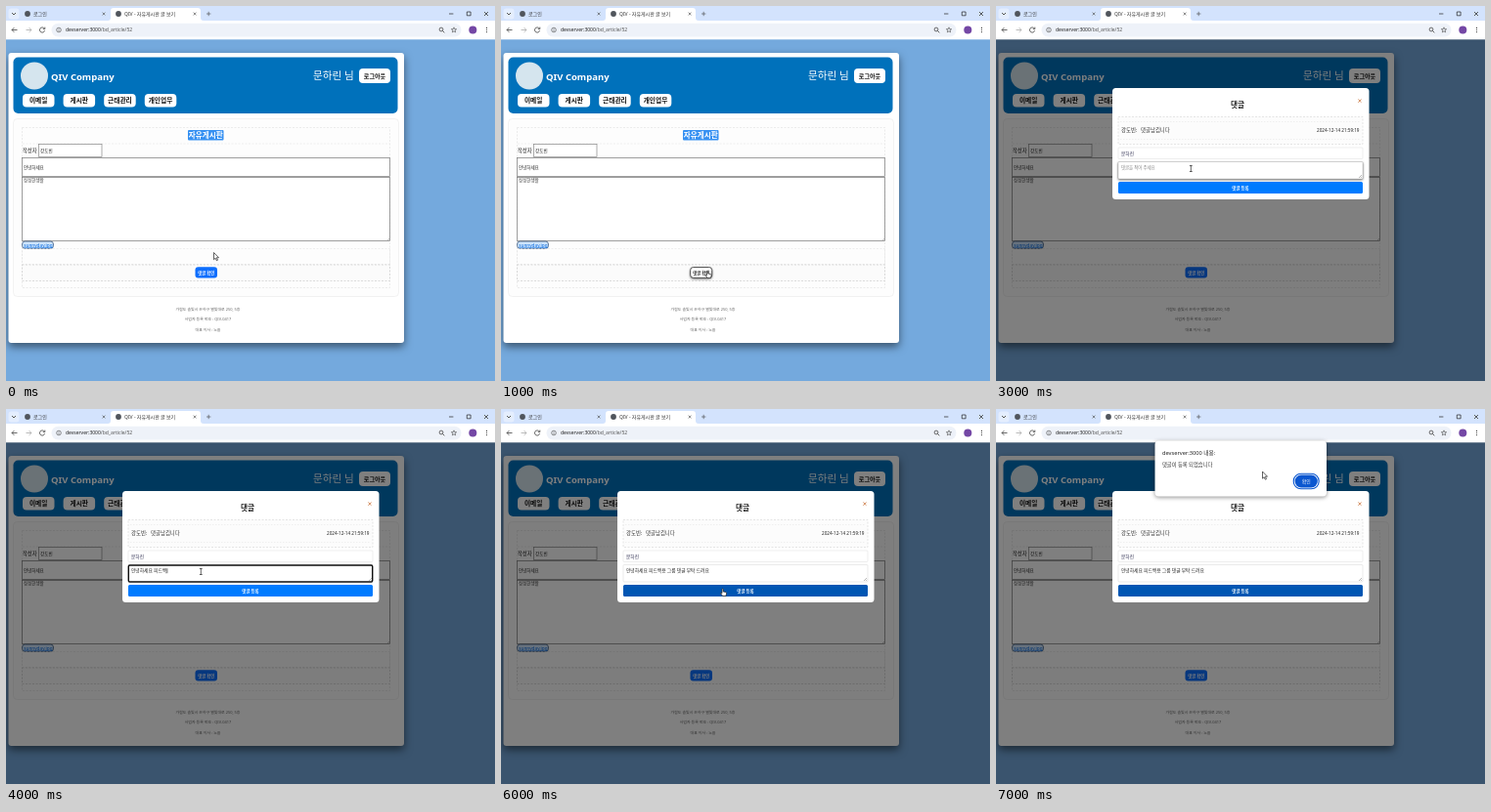
An HTML page that plays this animation: 500x384 px, repeating every 8 s.

```html
<!DOCTYPE html>
<html lang="ko">
<head>
<meta charset="utf-8">
<title>게시판</title>
<style>
html, body { margin: 0; width: 100%; height: 100%; overflow: hidden; background: #74a9dd; }
svg { display: block; width: 500px; height: 384px; }
text { font-family: "Noto Sans", "Noto Sans CJK KR", sans-serif; white-space: pre; }
.card { filter: drop-shadow(0 4px 4px rgba(0, 0, 0, .5)); }
.lift { filter: drop-shadow(0 1px 1px rgba(0, 0, 0, .55)); }
</style>
</head>
<body>
<svg id="stage" viewBox="0 0 500 384" xmlns="http://www.w3.org/2000/svg"></svg>
<script>
const NS = 'http://www.w3.org/2000/svg';
const stage = document.getElementById('stage');

function add(parent, tag, attrs = {}, content) {
  const el = document.createElementNS(NS, tag);
  for (const key in attrs) el.setAttribute(key, attrs[key]);
  if (content !== undefined) el.textContent = content;
  return parent.appendChild(el);
}
const group = (parent, attrs) => add(parent, 'g', attrs);
const box = (parent, x, y, width, height, fill, more) =>
  add(parent, 'rect', { x, y, width, height, fill, ...more });
const dot = (parent, cx, cy, r, fill, more) =>
  add(parent, 'circle', { cx, cy, r, fill, ...more });
const line = (parent, d, stroke = '#444', width = .8, more) =>
  add(parent, 'path', { d, stroke, 'stroke-width': width, fill: 'none', ...more });
const label = (parent, x, y, size, content, fill = '#222', more) =>
  add(parent, 'text', { x, y, 'font-size': size, fill, ...more }, content);
const show = (el, on) => el.setAttribute('visibility', on ? 'visible' : 'hidden');

const MID = { 'text-anchor': 'middle' };
const BOLD = { 'font-weight': 700 };
const MIDBOLD = { ...MID, ...BOLD };
const dashed = (color = '#d4d4d4', dash = '2 1.5') =>
  ({ stroke: color, 'stroke-width': .6, 'stroke-dasharray': dash });
const edge = (color, width = .7) => ({ stroke: color, 'stroke-width': width });

const USER = '문하린', WRITER = '강도빈', BRAND = 'QIV';
const HOST = 'devserver:3000';
const COMMENT = '안녕하세요 피드백용 그룹 댓글 부탁 드려요';

function drawPage(root) {
  box(root, 0, 34, 500, 350, '#74a9dd');
  box(root, 2.5, 48, 404.5, 297, '#fff', { rx: 3, class: 'card' });
  box(root, 7.5, 52.5, 393, 57.5, '#0071bb', { rx: 5 });
  dot(root, 29, 71.5, 14, '#d5e5ee');
  label(root, 46, 75.5, 9.5, BRAND + ' Company', '#fff', BOLD);
  label(root, 314, 75, 10.6, USER + ' 님', '#fff', { 'font-weight': 500 });
  box(root, 361, 64, 32, 15, '#fff', { rx: 4 });
  label(root, 377, 73.6, 6.1, '로그아웃', '#111', MIDBOLD);
  ['이메일', '게시판', '근태관리', '개인업무'].forEach((name, i) => {
    const x = 17 + i * 41.6;
    box(root, x, 90, 32.5, 13.5, '#fff', { rx: 4 });
    label(root, x + 16.2, 99.2, 6.7, name, '#111', MIDBOLD);
  });

  box(root, 7.5, 115.5, 394, 182, '#fdfdfd', { rx: 4, ...edge('#ececec') });
  box(root, 16.5, 124.5, 376, 164, 'none', dashed('#e0e0e0'));
  line(root, 'M17 141H392', '#e4e4e4', .6, { 'stroke-dasharray': '2 1.5' });
  box(root, 186, 127, 36.5, 10.5, '#3590f2', { rx: 1 });
  label(root, 204.2, 135, 7.6, '자유게시판', '#fff', MIDBOLD);
  label(root, 17, 149.8, 5.3, '작성자');
  box(root, 33.5, 141.5, 64.5, 13, '#fff', edge('#888'));
  label(root, 35, 150, 4.6, WRITER);
  box(root, 16.5, 155.5, 376, 19, '#fff', edge('#777'));
  label(root, 18, 166.8, 4.5, '안녕하세요');
  box(root, 16.5, 175.5, 376, 65, '#fff', edge('#777'));
  label(root, 18, 180.4, 4.5, '싱싱한생활', '#333');
  line(root, 'M390 240l2-2M391.3 240l.7-.7', '#777', .4);
  box(root, 16.5, 241, 32, 7.4, '#cde4fb', { rx: 3, ...edge('#2b4a70') });
  label(root, 18.3, 246.5, 4.7, 'sunnyday.jpg', '#0b6be0', { 'text-decoration': 'underline' });
  box(root, 16.5, 248.5, 376, 16, 'none', dashed('#e4e4e4'));
  box(root, 16.5, 265, 376, 16.5, '#fbfbfb', dashed('#c6c6c6'));

  const rest = group(root);
  box(rest, 193.5, 267.3, 22.5, 11.2, '#0d6efd', { rx: 3 });
  label(rest, 204.7, 274.5, 4.3, '댓글 확인', '#fff', MIDBOLD);
  const hover = group(root);
  box(hover, 193.7, 267.5, 22, 10.8, '#fff', { rx: 3, class: 'lift', ...edge('#333', .8) });
  label(hover, 204.7, 274.5, 4.3, '댓글 확인', '#222', MIDBOLD);

  ['가람도 솔빛시 은하구 별빛대로 250, 5층',
   '사업자 등록 번호 : ' + BRAND + '-0417',
   '대표 이사 : 노을'].forEach((row, i) =>
    label(root, 206.5, 311.6 + i * 10.8, 3.95, row, '#666', MID));
  return { rest, hover };
}

function drawModal(root) {
  box(root, 0, 34, 500, 350, '#000', { opacity: .5 });
  box(root, 119, 84, 262.5, 114, '#fff', { rx: 3.5 });
  label(root, 247, 104.4, 7.7, '댓글', '#222', MIDBOLD);
  line(root, 'M370.3 95.5l3.2 3.2m0-3.2l-3.2 3.2', '#c9773f', .8);
  box(root, 125, 113.5, 250, 28, '#fcfcfc', dashed());
  line(root, 'M127 118.5H373M127 136.5H373', '#e0e0e0', .5, { 'stroke-dasharray': '1.5 1.5' });
  label(root, 128, 129, 5.4, WRITER + ':', '#222', { 'font-weight': 500 });
  label(root, 148, 129, 5.4, '댓글남깁니다', '#333');
  label(root, 371.5, 129, 4.6, '2024-12-14 21:59:19', '#222', { 'text-anchor': 'end', 'font-weight': 500 });

  box(root, 125, 145, 250, 11.5, '#fff', { rx: 1, ...edge('#e3e3e3', .6) });
  const nameHover = box(root, 125, 145, 250, 11.5, '#fff', { rx: 1, class: 'lift', ...edge('#bbb', .5) });
  label(root, 128, 152.5, 4.7, USER, '#335');

  box(root, 125, 159.5, 250, 17.5, '#fff', { rx: 1, ...edge('#dcdcdc', .6) });
  const areaHover = box(root, 125, 159.5, 250, 17.5, '#fff', { rx: 1, class: 'lift', ...edge('#bbb', .5) });
  const focus = box(root, 125.3, 160, 249.4, 17, '#fff', { rx: 1.2, ...edge('#111', 1.4) });
  line(root, 'M371 176l3-3M372.8 176l1.2-1.2', '#777', .5);
  const hint = label(root, 128, 167.4, 4.4, '댓글을 적어 주세요', '#888');
  const typed = label(root, 128, 167.4, 4.75, '', '#222');
  const caret = box(root, 0, 163.2, .6, 5, '#111');

  const submit = box(root, 125, 180, 250, 12, '#007bff', { rx: 1.5 });
  label(root, 250, 187.7, 4.4, '댓글 등록', '#fff', MIDBOLD);
  return { nameHover, areaHover, focus, hint, typed, caret, submit };
}

function drawBrowser(root) {
  box(root, 0, 0, 500, 16, '#d3e3fd');
  box(root, 0, 15, 500, 19.3, '#fff');
  box(root, 2.5, 2.5, 11, 11, '#e4eefe', { rx: 3 });
  line(root, 'M6 7l2 2 2-2', '#333');
  add(root, 'path', { d: 'M104 15q3 0 3-3V5q0-3 3-3H196q3 0 3 3v7q0 3 3 3z', fill: '#fff' });
  [[22, 28, '로그인'], [115, 121, BRAND + ' - 자유게시판 글 보기']].forEach(([cx, x, name]) => {
    dot(root, cx, 8, 2.9, '#50555c');
    label(root, x, 10, 5, name, '#333');
  });
  line(root, 'M98.6 6.6l2.8 2.8m0-2.8l-2.8 2.8M191.6 6.6l2.8 2.8m0-2.8l-2.8 2.8M205 8h4.4m-2.2-2.2v4.4', '#444', .6);
  line(root, 'M453 8h4.4M471.3 6h3.8v3.8h-3.8zM489 6l4 4m0-4l-4 4', '#222', .7);

  line(root, 'M11.5 24.5H6m2.4-2.4L6 24.5l2.4 2.4', '#444');
  line(root, 'M20.5 24.5H26m-2.4-2.4L26 24.5l-2.4 2.4', '#aaa');
  line(root, 'M39.2 23a2.6 2.6 0 1 0 .4 2.2M39.8 21.6v2h-2', '#444');
  box(root, 46.5, 17.8, 419, 13.6, '#eef2f9', { rx: 6.8 });
  dot(root, 54, 24.5, 2.3, 'none', edge('#444', .6));
  line(root, 'M54 24.2v1.6M54 22.9v.6', '#444', .6);
  const url = label(root, 61, 26.4, 5, '');
  add(url, 'tspan', {}, HOST);
  add(url, 'tspan', { fill: '#555' }, '/bd_article/52');
  dot(root, 445, 24, 1.9, 'none', edge('#333'));
  line(root, 'M446.4 25.4l1.9 1.9', '#333');
  const star = Array.from({ length: 10 }, (_, i) => {
    const r = i % 2 ? 1.2 : 2.8, a = i * Math.PI / 5;
    return (458 + r * Math.sin(a)).toFixed(2) + ',' + (24.6 - r * Math.cos(a)).toFixed(2);
  }).join(' ');
  add(root, 'polygon', { points: star, fill: 'none', ...edge('#444', .6) });
  dot(root, 477.3, 24.5, 4, '#7447a5');
  [22.4, 24.5, 26.6].forEach(y => dot(root, 491.5, y, .6, '#333'));
}

function drawAlert(root) {
  box(root, 162.5, 32.5, 175.5, 57, '#fff', { rx: 4, style: 'filter:drop-shadow(0 1px 2px rgba(0,0,0,.45))' });
  label(root, 170, 46.6, 5.7, HOST + ' 내용:', '#222');
  label(root, 170, 58.6, 5.3, '댓글이 등록 되었습니다', '#333');
  box(root, 304.2, 66.2, 26, 15.6, '#fff', { rx: 7.8, ...edge('#0b57d0', 1.1) });
  box(root, 305.6, 67.6, 23.2, 12.8, '#0b57d0', { rx: 6.4 });
  label(root, 317.2, 75.9, 4.9, '확인', '#fff', MID);
}

const page = drawPage(group(stage));
const modalRoot = group(stage);
const modal = drawModal(modalRoot);
drawBrowser(group(stage));
const alertRoot = group(stage);
drawAlert(alertRoot);

const pointers = {
  arrow: 'M0 0V7.2L1.7 5.7 2.8 8.2 4 7.7 2.9 5.2H5z',
  hand: 'M0 .4q.7-.8 1.2 0V3L4 3.6q.7.3.6 1L4 7.5H.7L-1.4 4.8q-.3-.8.5-.7l.9.7z',
  beam: 'M-1.4-3H1.4M0-3V3M-1.4 3H1.4'
};
const pointer = add(stage, 'path', { 'stroke-width': .7, 'stroke-linejoin': 'round' });

// One entry per second of the loop; text is the number of typed characters.
const steps = [
  { at: ['arrow', 212.5, 252.5] },
  { at: ['hand', 210.5, 271], check: true },
  { at: ['beam', 204.7, 156], modal: true, over: 'name' },
  { at: ['beam', 199.3, 166.5], modal: true, over: 'area' },
  { at: ['beam', 199.3, 166.5], modal: true, focus: true, text: 9 },
  { at: ['beam', 199.3, 166.5], modal: true, focus: true, text: COMMENT.length },
  { at: ['hand', 226, 184], modal: true, over: 'submit', text: COMMENT.length },
  { at: ['arrow', 272.5, 64], modal: true, over: 'submit', text: COMMENT.length, alert: true }
];

let current = -1;
function render(now) {
  const index = Math.floor(now / 1000) % steps.length;
  if (index !== current) {
    current = index;
    const s = steps[index], text = COMMENT.slice(0, s.text || 0);
    const [kind, x, y] = s.at;
    show(page.rest, !s.check);
    show(page.hover, s.check);
    modalRoot.style.display = s.modal ? '' : 'none';
    alertRoot.style.display = s.alert ? '' : 'none';
    show(modal.nameHover, s.over === 'name');
    show(modal.areaHover, s.over === 'area');
    show(modal.focus, s.focus);
    show(modal.hint, !text);
    show(modal.caret, s.focus);
    modal.typed.textContent = text;
    if (s.focus) modal.caret.setAttribute('x', 128.4 + modal.typed.getComputedTextLength());
    modal.submit.setAttribute('fill', s.over === 'submit' ? '#0056b3' : '#007bff');
    pointer.setAttribute('d', pointers[kind]);
    pointer.setAttribute('transform', `translate(${x} ${y})`);
    pointer.setAttribute('fill', kind === 'beam' ? 'none' : '#fff');
    pointer.setAttribute('stroke', '#222');
  }
}
const start = performance.now();
function tick() {
  render(performance.now() - start);
  requestAnimationFrame(tick);
}
tick();
</script>
</body>
</html>
```
